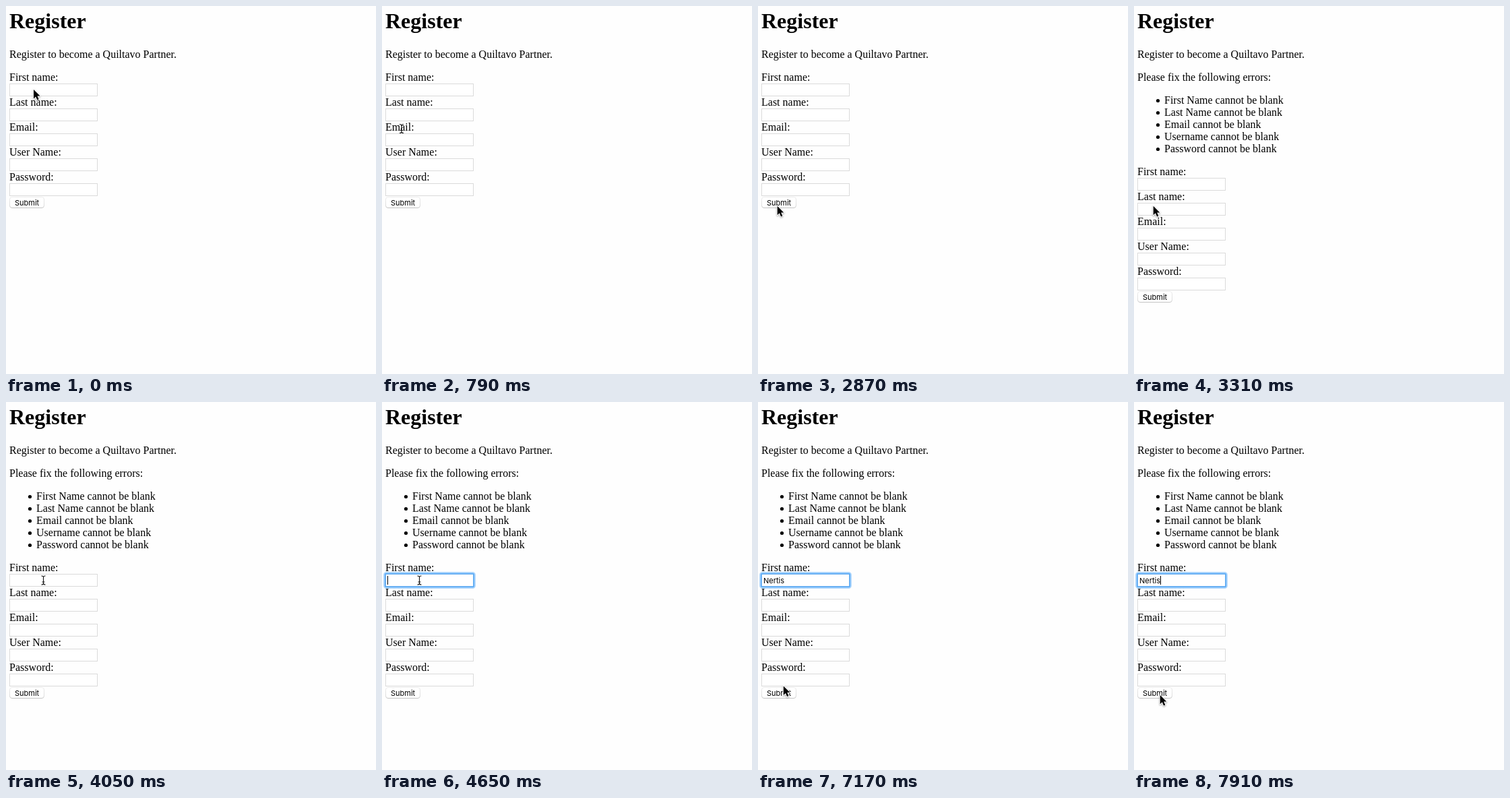
These frames come from a looping animation (549 by 546 pixels, 8 s). An HTML page:

```html
<!DOCTYPE html>
<html lang="en">
<head>
<meta charset="utf-8">
<title>Register</title>
<style>
  html, body { margin: 0; width: 100%; height: 100%; overflow: hidden; background: #fefefe; }
  svg { display: block; }
  text { font: 16px "Liberation Serif", "Times New Roman", serif; white-space: pre; }
  .title { font-size: 32px; font-weight: bold; }
  .ui { font: 11px Inter, sans-serif; }
  .box { fill: #fff; stroke: #dadada; }
  .ring { fill: none; stroke: #4aa3f7; }
  .arrow { stroke: #fff; stroke-width: 2; paint-order: stroke; stroke-linejoin: round;
           filter: drop-shadow(0 1px 1px rgba(0, 0, 0, .35)); }
  .beam { fill: none; stroke: #111; stroke-width: 1.1; }
</style>
</head>
<body>
<svg width="549" height="546" viewBox="0 0 549 546">
  <defs>
    <linearGradient id="edge" x2="0" y2="1">
      <stop offset="0" stop-color="#ececec"/>
      <stop offset=".75" stop-color="#dedede"/>
      <stop offset="1" stop-color="#c4c4c4"/>
    </linearGradient>
    <linearGradient id="press" x2="0" y2="1">
      <stop offset="0" stop-color="#6cb3fa"/>
      <stop offset="1" stop-color="#1a7df8"/>
    </linearGradient>
  </defs>
  <text class="title" x="5" y="33">Register</text>
  <text x="5" y="77">Register to become a Quiltavo Partner.</text>
  <g id="errors">
    <text x="5" y="111">Please fix the following errors:</text>
  </g>
  <g id="form">
    <g id="fields"></g>
    <g id="focus">
      <rect class="ring" x="4" y="114" width="133" height="21" rx="2.5" stroke-width="4" opacity=".4"/>
      <rect class="ring" x="4.8" y="114.8" width="131.4" height="19.4" rx="1" stroke-width="2" opacity=".75"/>
      <text class="ui" id="typed" x="8" y="129"></text>
      <rect id="caret" y="118" width="1" height="13"/>
    </g>
    <rect id="button" x="5.5" y="283.5" width="51" height="16" rx="3.5" fill="#fff" stroke="url(#edge)"/>
    <text class="ui" x="13" y="296">Submit</text>
  </g>
  <g id="pointer">
    <path class="arrow" id="arrow" d="M0 0V13.4L3.1 10.5L5.4 15.6L7.7 14.6L5.5 9.6H9.6Z"/>
    <path class="beam" id="beam" d="M-3 -6.5Q0 -6.5 0 -4.5Q0 -6.5 3 -6.5M0 -4.5V4.5M-3 6.5Q0 6.5 0 4.5Q0 6.5 3 6.5M-2 2.5H2"/>
  </g>
</svg>
<script>
const LOOP = 8000, NAME = 'Nertis', SHIFT = 140;
const $ = id => document.getElementById(id);

function add(parent, tag, attrs, label = '') {
  const el = document.createElementNS('http://www.w3.org/2000/svg', tag);
  for (const key in attrs) el.setAttribute(key, attrs[key]);
  el.textContent = label;
  parent.append(el);
}

['First name:', 'Last name:', 'Email:', 'User Name:', 'Password:'].forEach((label, i) => {
  const y = 111 + 37 * i;
  add($('fields'), 'text', { x: 5, y }, label);
  add($('fields'), 'rect', { class: 'box', x: 5.5, y: y + 4.5, width: 130, height: 18 });
});

['First Name', 'Last Name', 'Email', 'Username', 'Password'].forEach((label, i) => {
  const y = 145 + 18 * i;
  add($('errors'), 'circle', { cx: 35.5, cy: y - 4.5, r: 2.6 });
  add($('errors'), 'text', { x: 45, y }, label + ' cannot be blank');
});

// time, x, y, shape
const path = [
  [0, 41, 124, 'arrow'],
  [500, 37, 147, 'beam'], [647, 29, 182, 'beam'], [794, 22, 217, 'beam'],
  [941, 19, 249, 'beam'], [1088, 20, 274, 'beam'], [1235, 23, 290, 'arrow'],
  [1382, 27, 297, 'arrow'], [1530, 28.7, 296.8, 'arrow'],
  [3610, 47, 262, 'beam'], [3757, 70, 217, 'beam'],
  [3904, 63, 246, 'beam'], [4050, 55.5, 264.5, 'beam'],
  [7030, 51, 335, 'beam'], [7170, 37.8, 421.5, 'arrow'], [7320, 46, 488, 'arrow'],
  [7470, 59, 532, 'arrow'], [7620, 50, 505, 'arrow'], [7770, 41, 452, 'arrow'],
  [7910, 38.7, 434.8, 'arrow']
];
const keys = [5390, 5690, 5980, 6280, 6430, 6580];

const show = (id, on) => $(id).setAttribute('visibility', on ? 'visible' : 'hidden');
const within = (t, from, to) => t >= from && t < to;

function draw(t) {
  const failed = t >= 3310, focused = t >= 4650;
  show('errors', failed);
  $('form').setAttribute('transform', `translate(0 ${failed ? SHIFT : 0})`);
  $('button').setAttribute('fill', within(t, 2720, 2870) ? 'url(#press)' : '#fff');

  const count = keys.filter(k => t >= k).length;
  $('typed').textContent = NAME.slice(0, count);
  const width = count ? $('typed').getComputedTextLength() : 0;
  $('caret').setAttribute('x', Math.round(8 + width));
  show('focus', focused);
  show('caret', focused && !within(t, 5100, 5390) && !within(t, 7030, 7620));

  const [, x, y, shape] = path.findLast(p => t >= p[0]);
  $('pointer').setAttribute('transform', `translate(${x} ${y})`);
  show('arrow', shape === 'arrow');
  show('beam', shape === 'beam');
}

function tick() {
  draw(performance.now() % LOOP);
  requestAnimationFrame(tick);
}
tick();
</script>
</body>
</html>
```
